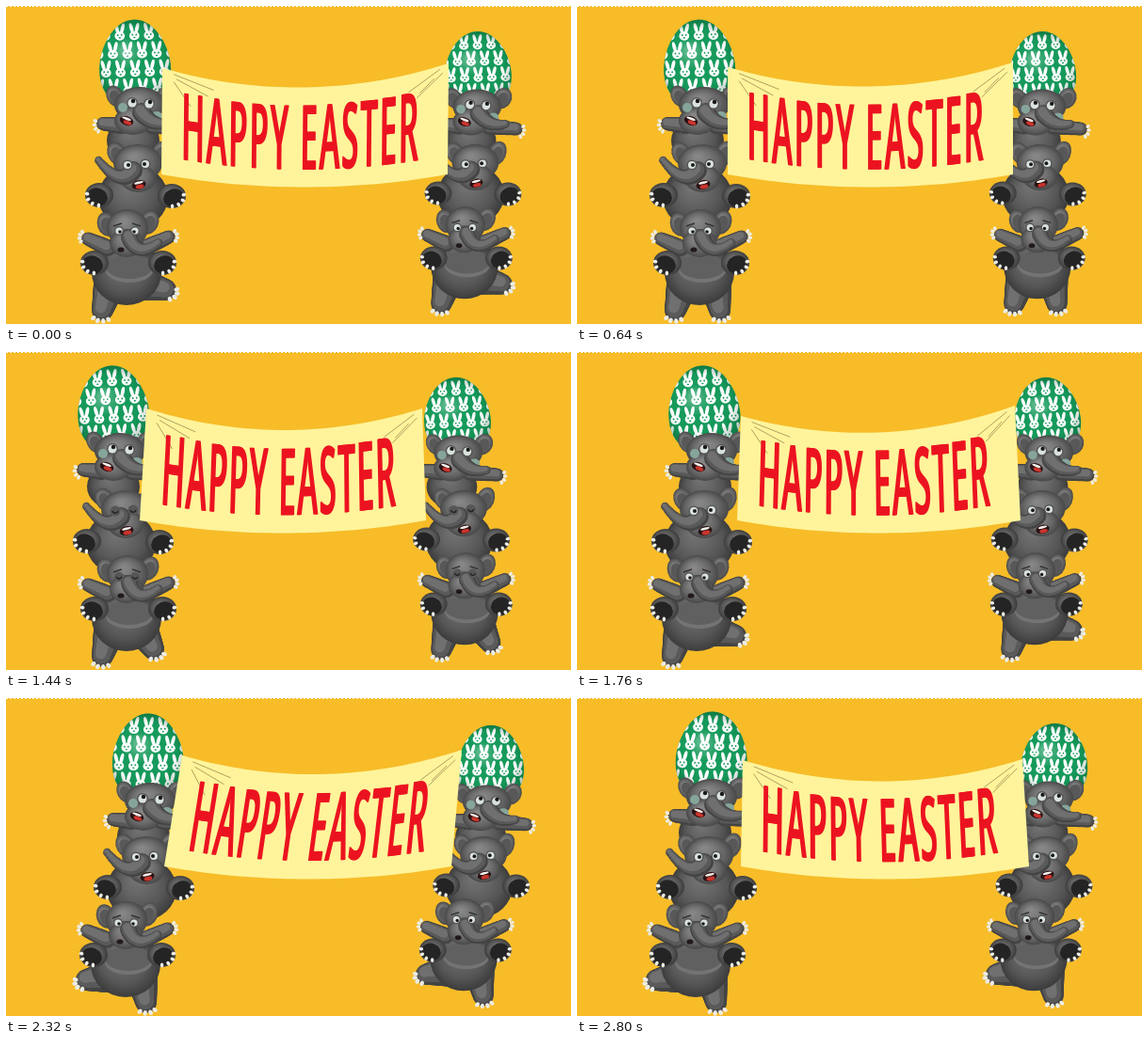
An HTML page with a canvas for the animation above (2.88 s loop, 600 by 338 pixels).

```html
<!DOCTYPE html>
<html lang="en">
<head>
<meta charset="utf-8">
<title>Happy Easter</title>
<style>
html, body { margin: 0; height: 100%; overflow: hidden; background: #f7bc28; }
canvas { display: block; }
</style>
</head>
<body>
<canvas id="stage" width="600" height="338"></canvas>
<script>
const ctx = document.getElementById('stage').getContext('2d');
const LOOP = 2880, STEP = 80, TAU = Math.PI * 2;

// time, x of egg / top / middle / bottom, banner corners: tlx tly blx trx try brx
const POSES = [
  [0, 137, 139, 131, 128, 166, 66, 165, 470, 61, 469],
  [640, 130, 132, 124, 130, 160, 65, 160, 463, 60, 463],
  [960, 142, 136, 125, 125, 168, 67, 164, 467, 57, 465],
  [1440, 114, 118, 118, 128, 149, 60, 142, 442, 60, 446],
  [1760, 135, 140, 126, 127, 174, 68, 170, 465, 57, 471],
  [2320, 151, 150, 140, 127, 187, 61, 168, 484, 55, 473],
  [2800, 143, 140, 131, 126, 176, 66, 174, 473, 65, 480]
];
// time, raised leg: 1 right, -1 left, 0 both down
const STEPS = [[0, 1], [320, -1], [640, 0], [960, -1], [1200, 1], [1440, .35],
  [1760, 1], [2080, -1], [2320, -1], [2560, 1], [2800, -1]];

function between(keys, t) {
  let i = 0;
  while (i < keys.length - 2 && keys[i + 1][0] <= t) i++;
  const a = keys[i], b = keys[i + 1];
  const k = (1 - Math.cos(Math.PI * (t - a[0]) / (b[0] - a[0]))) / 2;
  return a.slice(1).map((v, n) => v + (b[n + 1] - v) * k);
}

function shade(x, y, r0, r1, stops) {
  const g = ctx.createRadialGradient(x, y, r0, 0, 0, r1);
  stops.forEach((color, i) => g.addColorStop(i / (stops.length - 1), color));
  return g;
}
const skin = shade(-.15, -.3, .1, 1, ['#717171', '#656565', '#565656', '#3c3c3c']);
const face = shade(-.2, -.35, .1, 1, ['#868686', '#787878', '#656565', '#484848']);
const shell = shade(-12, -14, 2, 48, ['#ffffff50', '#ffffff00', '#00301808', '#00301860']);

function oval(x, y, rx, ry, fill = skin, turn = 0) {
  ctx.save();
  ctx.translate(x, y);
  ctx.rotate(turn);
  ctx.scale(rx, ry);
  ctx.beginPath();
  ctx.arc(0, 0, 1, 0, TAU);
  ctx.fillStyle = fill;
  ctx.fill();
  ctx.restore();
}

// tapered tube along a quadratic curve
function tube(x0, y0, cx, cy, x1, y1, r0, r1) {
  for (const [size, shift, fill] of [[1, 0, '#454545'], [.8, .1, '#5a5a5a'], [.5, .25, '#707070']]) {
    for (let k = 0; k <= 1; k += .05) {
      const j = 1 - k, r = r0 + (r1 - r0) * k;
      oval(j * j * x0 + 2 * j * k * cx + k * k * x1 - r * shift * .6,
        j * j * y0 + 2 * j * k * cy + k * k * y1 - r * shift, r * size, r * size, fill);
    }
  }
}
const limb = (x0, y0, x1, y1, r0, r1) => tube(x0, y0, (x0 + x1) / 2, (y0 + y1) / 2, x1, y1, r0, r1);

function nails(x, y, rx, ry, angle, size = 2) {
  for (let i = -1.5; i <= 1.5; i++) {
    const a = angle + i * .55;
    oval(x + Math.cos(a) * rx, y + Math.sin(a) * ry, size * 1.2, size * .9, '#ecece6', a);
  }
}

function sole(x, y, side) {
  oval(x, y, 15, 13);
  oval(x + side * 2, y + 2, 11, 9.5, '#242424', -side * .4);
  nails(x, y, 13, 11, side > 0 ? .7 : Math.PI - .7);
}

function ear(x, y, rx, ry, turn) {
  oval(x, y, rx, ry, face, turn);
  oval(x, y + 1, rx * .6, ry * .65, '#585858', turn);
}

function eye(x, y, r, dx, dy, shut) {
  oval(x, y, r + 1.5, r + 1.5, '#565656');
  if (shut) {
    ctx.beginPath();
    ctx.arc(x, y - 1, r * .8, .3, Math.PI - .3);
    ctx.strokeStyle = '#222';
    ctx.lineWidth = 1.4;
    ctx.stroke();
  } else {
    oval(x, y, r, r, '#d9e2dc');
    oval(x + dx, y + dy, r * .5, r * .5, '#1a1a1a');
  }
}

function mouth(x, y, turn) {
  oval(x, y, 7.5, 4.8, '#2a1214', turn);
  oval(x + 1, y + 2, 4.5, 2.2, '#c8342c', turn);
  oval(x, y - 2.2, 5, 1.3, '#f4f0ea', turn);
}

function egg(x, y, turn) {
  ctx.save();
  ctx.translate(x, y);
  ctx.rotate(turn);
  ctx.beginPath();
  ctx.moveTo(0, -46);
  ctx.bezierCurveTo(23, -46, 38, -15, 38, 7);
  ctx.bezierCurveTo(38, 34, 22, 46, 0, 46);
  ctx.bezierCurveTo(-22, 46, -38, 34, -38, 7);
  ctx.bezierCurveTo(-38, -15, -23, -46, 0, -46);
  ctx.clip();
  ctx.fillStyle = '#159a5b';
  ctx.fillRect(-40, -50, 80, 100);
  for (let row = 0; row < 5; row++) {
    for (let col = -3; col <= 3; col++) bunny(col * 15.5 + row % 2 * 7.75, -33 + row * 19.5);
  }
  ctx.fillStyle = shell;
  ctx.fillRect(-40, -50, 80, 100);
  ctx.restore();
}

function bunny(x, y) {
  for (const s of [-1, 1]) oval(x + s * 3, y - 4, 1.9, 5.5, '#fff', s * .25);
  oval(x, y + 4, 5.4, 4.8, '#fff');
  for (const s of [-1, 1]) oval(x + s * 2, y + 3, .9, 1, '#159a5b');
  oval(x, y + 6, 1.2, .8, '#159a5b');
}

function topElephant(x, dy) {
  const y = 113 + dy;
  oval(x - 4, y + 30, 28, 24);
  limb(x - 16, y + 14, x - 37, y + 12, 9, 7);
  nails(x - 38, y + 13, 7, 8, Math.PI * .9);
  limb(x + 16, y + 14, x + 48, y + 17, 9, 7);
  nails(x + 48, y + 18, 7, 8, .3);
  ear(x - 23, y - 17, 9, 12, -.5);
  ear(x + 31, y - 17, 10, 12, .5);
  oval(x + 3, y - 8, 27, 19, face);
  oval(x - 4, y + 9, 20, 15, face);
  oval(x - 15, y - 5, 5, 5, '#86a59a');
  oval(x + 21, y + 4, 6, 5, '#86a59a');
  mouth(x - 11, y + 9, .35);
  tube(x + 5, y, x + 16, y + 16, x + 36, y + 11, 10, 4.5);
  eye(x - 5, y - 10, 4.5, 1, -2);
  eye(x + 13, y - 9, 4.5, 1, -2);
}

function middleElephant(x, shut) {
  oval(x + 4, 203, 37, 34);
  sole(x - 32, 201, -1);
  sole(x + 45, 202, 1);
  ear(x - 13, 157, 10, 13, -.5);
  ear(x + 33, 157, 10, 14, .4);
  oval(x + 9, 167, 26, 20, face);
  oval(x + 9, 183, 19, 15, face);
  mouth(x + 10, 190, -.25);
  tube(x + 4, 175, x - 10, 194, x - 35, 161, 10, 4);
  eye(x - 2, 169, 4, 1, 0, shut);
  eye(x + 17, 168, 4, -1, 0, shut);
}

function bottomElephant(x, lift, shut) {
  const right = Math.max(lift, 0), left = Math.max(-lift, 0);
  const lx = x - 26 - left * 17, ly = 325 - left * 25;
  const rx = x + 22 + right * 21, ry = 325 - right * 23;
  limb(x - 18, 296, lx, ly, 17, 11);
  nails(lx, ly + 2, 11, 8, Math.PI * (.55 + left * .3), 2.4);
  limb(x + 17, 296, rx, ry, 17, 11);
  nails(rx, ry + 2, 11, 8, Math.PI * (.45 - right * .3), 2.4);
  oval(x, 283, 37, 35);
  oval(x + 3, 281, 25, 13, '#747474');
  oval(x + 3, 277, 25, 13, '#606060');
  limb(x - 20, 257, x - 42, 247, 9, 7);
  nails(x - 43, 246, 7, 7, Math.PI * 1.05);
  limb(x + 20, 257, x + 46, 245, 9, 7);
  nails(x + 47, 245, 7, 7, -.1);
  sole(x - 34, 273, -1);
  sole(x + 38, 273, 1);
  ear(x - 21, 232, 10, 13, -.3);
  ear(x + 24, 230, 10, 13, .4);
  oval(x + 1, 236, 22, 20, face);
  oval(x, 252, 18, 15, face);
  oval(x - 6, 259, 3.5, 2.6, '#221a1a');
  tube(x + 3, 246, x + 12, 270, x + 36, 250, 9, 4.5);
  eye(x - 8, 239, 3.6, 1, 1, shut);
  eye(x + 9, 239, 3.6, -1, 1, shut);
  ctx.strokeStyle = '#333';
  ctx.lineWidth = 1.4;
  ctx.beginPath();
  ctx.moveTo(x - 14, 234);
  ctx.lineTo(x - 5, 231);
  ctx.moveTo(x + 6, 231);
  ctx.lineTo(x + 15, 234);
  ctx.stroke();
}

function stack(second, pose, lift, shut) {
  const [eggX, top, middle, bottom] = pose;
  const dy = Math.max(0, top - 140) * .4;
  ctx.save();
  if (second) ctx.transform(.96, 0, 0, .96, 364, 6);
  ctx.save();
  ctx.translate(eggX + (second ? 6 : 0), 106.5 + dy * .5);
  if (second) ctx.scale(.97, .92);
  egg(0, -46, (eggX - top) * .012);
  ctx.restore();
  topElephant(top, dy);
  middleElephant(middle, shut);
  bottomElephant(bottom, lift, shut);
  ctx.restore();
}

function banner([tlx, tly, blx, trx, tryy, brx]) {
  const at = (u, v) => {
    const sag = 4 * u * (1 - u);
    const tx = tlx + (trx - tlx) * u, ty = tly + (tryy - tly) * u + sag * 23;
    const bx = blx + (brx - blx) * u, by = 179 + sag * 13.5;
    return [tx + (bx - tx) * v, ty + (by - ty) * v];
  };
  ctx.beginPath();
  for (let u = 0; u <= 40; u++) ctx.lineTo(...at(u / 40, 0));
  for (let u = 40; u >= 0; u--) ctx.lineTo(...at(u / 40, 1));
  ctx.fillStyle = '#fff49b';
  ctx.fill();

  ctx.beginPath();
  for (const [u0, v0, u1, v1] of [[.04, .03, .18, .1], [.05, .07, .16, .17], [.04, .1, .1, .3],
    [.97, .03, .86, .17], [.98, .07, .89, .24], [.95, .1, .9, .2]]) {
    ctx.moveTo(...at(u0, v0));
    ctx.lineTo(...at(u1, v1));
  }
  ctx.strokeStyle = '#8d7b45';
  ctx.lineWidth = .7;
  ctx.stroke();

  const text = 'HAPPY EASTER', squeeze = .335, tracking = 6;
  ctx.font = '600 98px "Open Sans", "Noto Sans", sans-serif';
  ctx.fillStyle = '#ec1320';
  const widths = [...text].map(letter => ctx.measureText(letter).width + tracking);
  const total = widths.reduce((a, b) => a + b);
  let pen = 0;
  widths.forEach((w, i) => {
    const u = .065 + .835 * (pen + w / 2) / total;
    const [x, y] = at(u, .825), [x0, y0] = at(u - .02, .825), [x1, y1] = at(u + .02, .825);
    const [ux, uy] = at(u, .18);
    const slope = (y1 - y0) / (x1 - x0);
    ctx.save();
    ctx.transform(squeeze, slope * squeeze, (x - ux) / 70, (y - uy) / 70, x, y);
    for (const d of [-1.5, 1.5]) ctx.fillText(text[i], d - (w - tracking) / 2, 0);
    ctx.restore();
    pen += w;
  });
}

function draw(now) {
  const t = Math.floor(now % LOOP / STEP) * STEP;
  const pose = between(POSES, t), [lift] = between(STEPS, t);
  const shut = t >= 1360 && t <= 1520;
  ctx.fillStyle = '#f7bc28';
  ctx.fillRect(0, 0, 600, 338);
  ctx.fillStyle = '#fff';
  for (let x = 0; x < 600; x += 4) ctx.fillRect(x, 0, 2, 1);
  stack(false, pose, lift, shut);
  stack(true, pose, lift, shut);
  banner(pose.slice(4));
}

let start;
function tick(now) {
  start ??= now;
  draw(now - start);
  requestAnimationFrame(tick);
}
draw(0);
requestAnimationFrame(tick);
</script>
</body>
</html>
```
